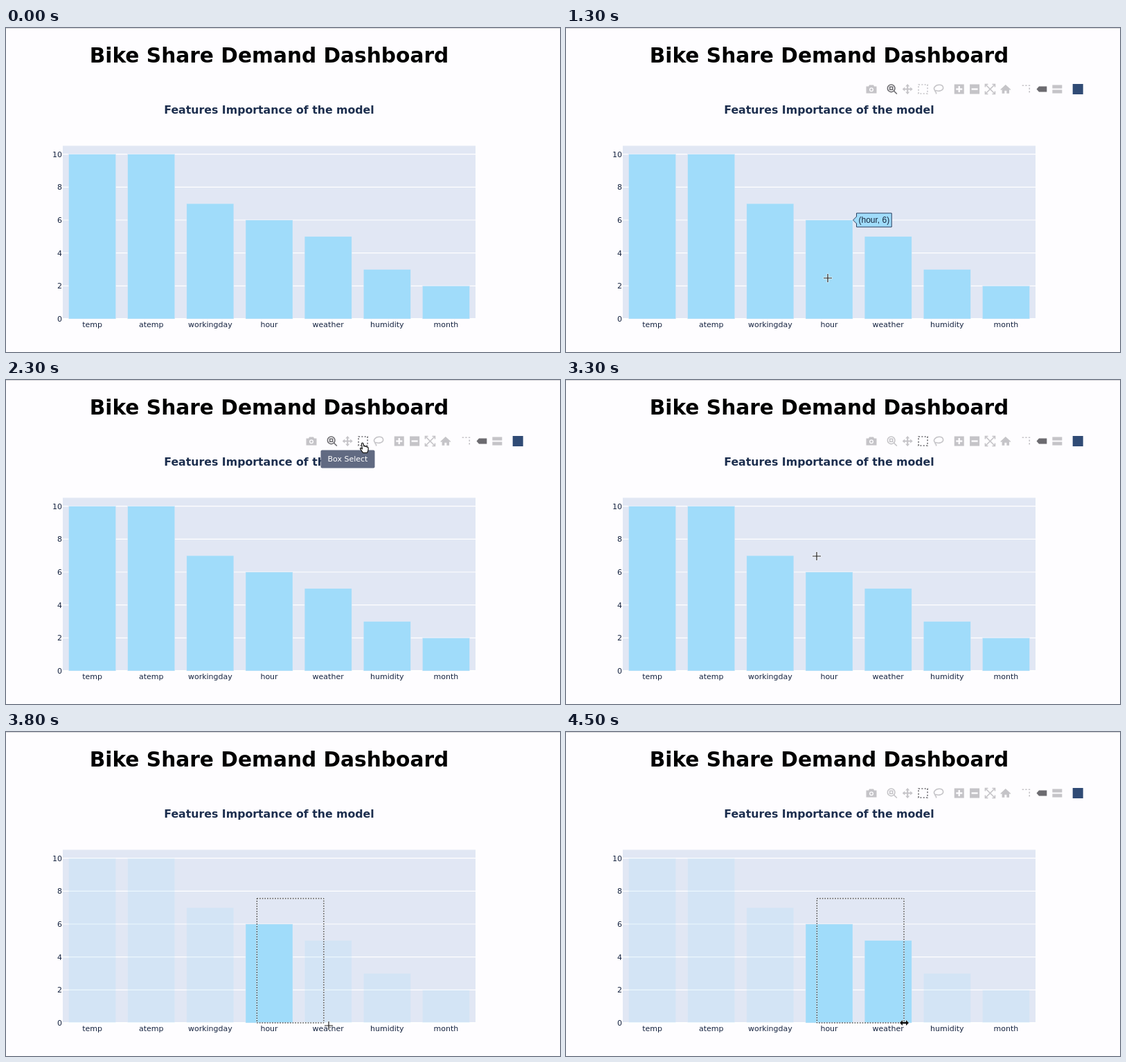
Recreate the animation shown at these times as an HTML page. Size 800 by 469 pixels, loop 4.6 s.

```html
<!DOCTYPE html>
<html lang="en">
<head>
<meta charset="utf-8">
<title>Bike Share Demand Dashboard</title>
<style>
  html, body { margin: 0; width: 100%; height: 100%; overflow: hidden; background: #fefdff; }
  svg { display: block; width: 800px; height: 469px; font: 11px "DejaVu Sans", sans-serif; }
  .title { font-size: 29.65px; font-weight: bold; fill: #000; }
  .subtitle { font-size: 15.78px; font-weight: bold; fill: #1c2e4e; }
  .tick { fill: #152340; }
  .mid { text-anchor: middle; }
  .end { text-anchor: end; }
  .icon { color: #c5c4c8; fill: currentColor; }
  .icon.on { color: #6c6b70; }
  .line { fill: none; stroke: currentColor; stroke-width: 1.6; }
  .hole { fill: #fefdff; }
  #hover text { font: 12px "Liberation Sans", Arial, sans-serif; fill: #17263c; }
</style>
</head>
<body>
<svg viewBox="0 0 800 469">
  <rect width="800" height="469" fill="#fefdff"/>
  <rect width="800" height="1" fill="#d6d5da"/>
  <text class="title mid" x="380" y="50">Bike Share Demand Dashboard</text>
  <text class="subtitle mid" x="380" y="123.8">Features Importance of the model</text>
  <rect x="82" y="170.5" width="596" height="250.5" fill="#e1e7f4"/>
  <g id="grid"></g>
  <g id="bars"></g>
  <g id="ticks"></g>
  <g id="modebar"></g>
  <g id="select" fill="none">
    <path id="outline" stroke="#fff"/>
    <path id="dashes" stroke="#111" stroke-dasharray="1.84"/>
    <path id="handles" fill="#fff" stroke="#333" stroke-width=".9"/>
  </g>
  <g id="hover">
    <path fill="#a0dcfa" stroke="#2a3f5f"/>
    <text></text>
  </g>
  <g id="tooltip">
    <rect x="454.5" y="101.5" width="78" height="26" rx="2" fill="#616a82"/>
    <text class="mid" x="493.5" y="118" fill="#fff">Box Select</text>
  </g>
  <g id="cursor" stroke-linejoin="round">
    <g data-kind="cross">
      <path d="M-6.5 0H6.5M0-6.5V6.5" stroke="#fff" stroke-width="3" opacity=".75"/>
      <path d="M-6 0H6M0-6V6" stroke="#222" stroke-width="1.2"/>
    </g>
    <path data-kind="hand" fill="#fff" stroke="#111" stroke-width="1.2"
      d="M-2.5-5q1.2-2 2.4 0l1 4q2-1.5 2.2.4q2-1 2.2.8q1.8-.6 1.8 1.2v3l-1.5 4h-6l-4-5.6q-.5-2.2 1.8-1l1 1Z"/>
    <path data-kind="resize" fill="#111" stroke="#fff" paint-order="stroke"
      d="M-6.5 0l4-4v2.8h5V-4l4 4l-4 4V1.2h-5V4Z"/>
  </g>
</svg>
<script>
const STEP = 100, STEPS = 46;
const TOOL = 23, DRAG = 33, RELEASE = 45;
const BASE = 421, UNIT = 23.83, PITCH = 85.14, HALF = 34;
const features = { temp: 10, atemp: 10, workingday: 7, hour: 6, weather: 5, humidity: 3, month: 2 };
const names = Object.keys(features);
const $ = id => document.getElementById(id);
const centre = i => 124.6 + i * PITCH;
const level = v => BASE - v * UNIT;
const ramp = (s, from, to) => Math.min(1, Math.max(0, (s - from) / (to - from)));
const show = (el, on) => el.setAttribute("visibility", on ? "inherit" : "hidden");

for (let v = 0; v <= 10; v += 2) {
  $("grid").innerHTML += `<path d="M82 ${level(v)}H678" stroke="#fff" stroke-width="${v ? 1.2 : 1.8}"/>`;
  $("ticks").innerHTML += `<text class="tick end" x="81" y="${level(v) + 4}">${v}</text>`;
}
names.forEach((name, i) => {
  const v = features[name];
  $("bars").innerHTML += `<rect x="${centre(i) - HALF}" y="${level(v)}" width="${2 * HALF}"
    height="${v * UNIT}" fill="#a0dcfa" stroke="#e1e7f4" stroke-width=".4"/>`;
  $("ticks").innerHTML += `<text class="tick mid" x="${centre(i)}" y="432.9">${name}</text>`;
});

// Toolbar icons, each drawn around its own centre
const path = (d, more = "") => `<path d="${d}" ${more}/>`;
const line = (d, dash = "none") => path(d, `class="line" stroke-dasharray="${dash}"`);
const block = (y, h) => `<rect x="-7" y="${y}" width="14" height="${h}"/>`;
const around = shape => [0, 90, 180, 270].map(a => `<g transform="rotate(${a})">${shape}</g>`).join("");
const minus = block(-7, 14) + path("M-4.5-1.2h9v2.4h-9Z", 'class="hole"');
const groups = [
  { camera: path("M-7.5-4h3.5l1-2h6l1 2h3.5v10h-15Z") + '<circle r="3" cy=".7" class="hole"/><circle r="1.6" cy=".7"/>' },
  {
    zoom: '<circle cx="-1.2" cy="-1.2" r="5.3" class="line"/>' + line("M-3.2-3.2h4v4h-4ZM2.5 2.5l4.5 4.5"),
    pan: around(path("M0-7.5l3 3.5h-2v4h-2v-4h-2Z")),
    box: line("M-6.5-6.5h13v13h-13Z", "2 2.33"),
    lasso: line("M-4.5 2.5C-9-1-4.5-6.2 1-6.2C8-6.2 8.5.5 3 2.2S-3 1-4.5 2.5S-2 4-3.5 7")
  },
  {
    plus: minus + path("M-1.2-4.5h2.4v9h-2.4Z", 'class="hole"'),
    minus,
    fit: around(line("M7-3v-4h-4M7-7L0 0")),
    home: path("M0-6.5l7.5 7l-1 1l-1.3-1v5.8h-3.7v-4h-3v4h-3.7V.5l-1.3 1l-1-1Z")
  },
  {
    spike: line("M-6-5.2H6M4.6-2V6", "2.4 2.2"),
    closest: path("M-7.5 0l3.5-4h11.3v8H-4Z"),
    compare: block(-6, 5) + block(1, 5)
  },
  { logo: `<rect x="-7.5" y="-7.5" width="15" height="15" fill="#304b75"/>` }
];
let iconX = 441;
for (const group of groups) {
  for (const [name, shape] of Object.entries(group)) {
    $("modebar").innerHTML += `<g id="${name}" class="icon" transform="translate(${iconX} 88.5)">${shape}</g>`;
    iconX += 22.35;
  }
  iconX += 7.5;
}
$("closest").classList.add("on");

// Pointer glides; ex and ey bend the drag on each axis
const glides = [
  { from: 1, to: 6, x: 313, y: 266 },
  { from: 6, to: 7, x: 416, y: 360 },
  { from: 8, to: 9, x: 274, y: 423 },
  { from: 9, to: 11, x: 376, y: 366 },
  { from: 12, to: 13, x: 378, y: 362 },
  { from: 13, to: 15, x: 456, y: 366 },
  { from: 16, to: TOOL, x: 516, y: 97 },
  { from: 26, to: DRAG, x: 362, y: 255 },
  { from: DRAG, to: 38, x: 466, y: 425, ex: k => k ** 1.27, ey: k => 1 - (1 - k) ** 2.8 },
  { from: 38, to: 43, x: 488, y: 427 },
  { from: 44, to: RELEASE, x: 488.5, y: BASE }
];
function pointer(s) {
  let x = 400, y = 462;
  for (const { from, to, x: endX, y: endY, ex = k => k, ey = k => k } of glides) {
    const k = ramp(s, from, to);
    x += (endX - x) * ex(k);
    y += (endY - y) * ey(k);
  }
  return [x, y];
}

function drawHover(s) {
  const [px, py] = pointer(s);
  const i = names.findIndex((name, n) =>
    Math.abs(px - centre(n)) < HALF && py > level(features[name]) && py < BASE);
  const on = s > 0 && s < DRAG && i >= 0;
  show($("hover"), on);
  if (!on) return;
  const value = features[names[i]];
  const x = centre(i) + HALF + 5.5, y = level(value);
  const [box, text] = $("hover").children;
  text.textContent = `(${names[i]}, ${value})`;
  text.setAttribute("x", x + 3);
  text.setAttribute("y", y + 4.3);
  const right = x + text.getComputedTextLength() + 6;
  box.setAttribute("d", `M${x - 5} ${y}l5-5v-5H${right}v20H${x}v-5Z`);
}

function drawSelection(s) {
  const active = s > DRAG, band = s === DRAG + 1;
  const [x, y] = pointer(Math.min(s, RELEASE - 1) - 0.27);
  const left = band ? 82 : 362.3, right = band ? 678 : x, bottom = Math.min(y, BASE);
  const d = `M${left} 241H${right}V${bottom}H${left}Z`;
  show($("select"), active);
  $("outline").setAttribute("d", d);
  $("dashes").setAttribute("d", d);
  $("handles").setAttribute("d", band ? `M351 237h23v4.3h-23ZM351 ${bottom - 1}h23v4.3h-23Z` : "");
  [...$("bars").children].forEach((bar, i) => {
    const picked = !band && centre(i) >= left && centre(i) <= right;
    bar.setAttribute("opacity", !active || picked ? 1 : 0.2);
  });
}

function drawCursor(s) {
  const kind = s >= TOOL && s < TOOL + 5 ? "hand" : s >= RELEASE ? "resize" : "cross";
  show($("cursor"), s > 0);
  $("cursor").setAttribute("transform", `translate(${pointer(s)})`);
  for (const shape of $("cursor").children) show(shape, shape.dataset.kind === kind);
}

function draw(s) {
  const toolbar = ramp(s, 0, 3) - ramp(s, DRAG, DRAG + 1.7) + ramp(s, RELEASE - 2, RELEASE);
  $("modebar").setAttribute("opacity", toolbar);
  $("zoom").classList.toggle("on", s < TOOL + 2);
  $("box").classList.toggle("on", s >= TOOL);
  show($("tooltip"), s >= TOOL && s < TOOL + 4);
  drawHover(s);
  drawSelection(s);
  drawCursor(s);
}

const start = performance.now();
function tick(now) {
  draw(Math.floor(Math.max(0, now - start) / STEP) % STEPS);
  requestAnimationFrame(tick);
}
draw(0);
requestAnimationFrame(tick);
</script>
</body>
</html>
```
